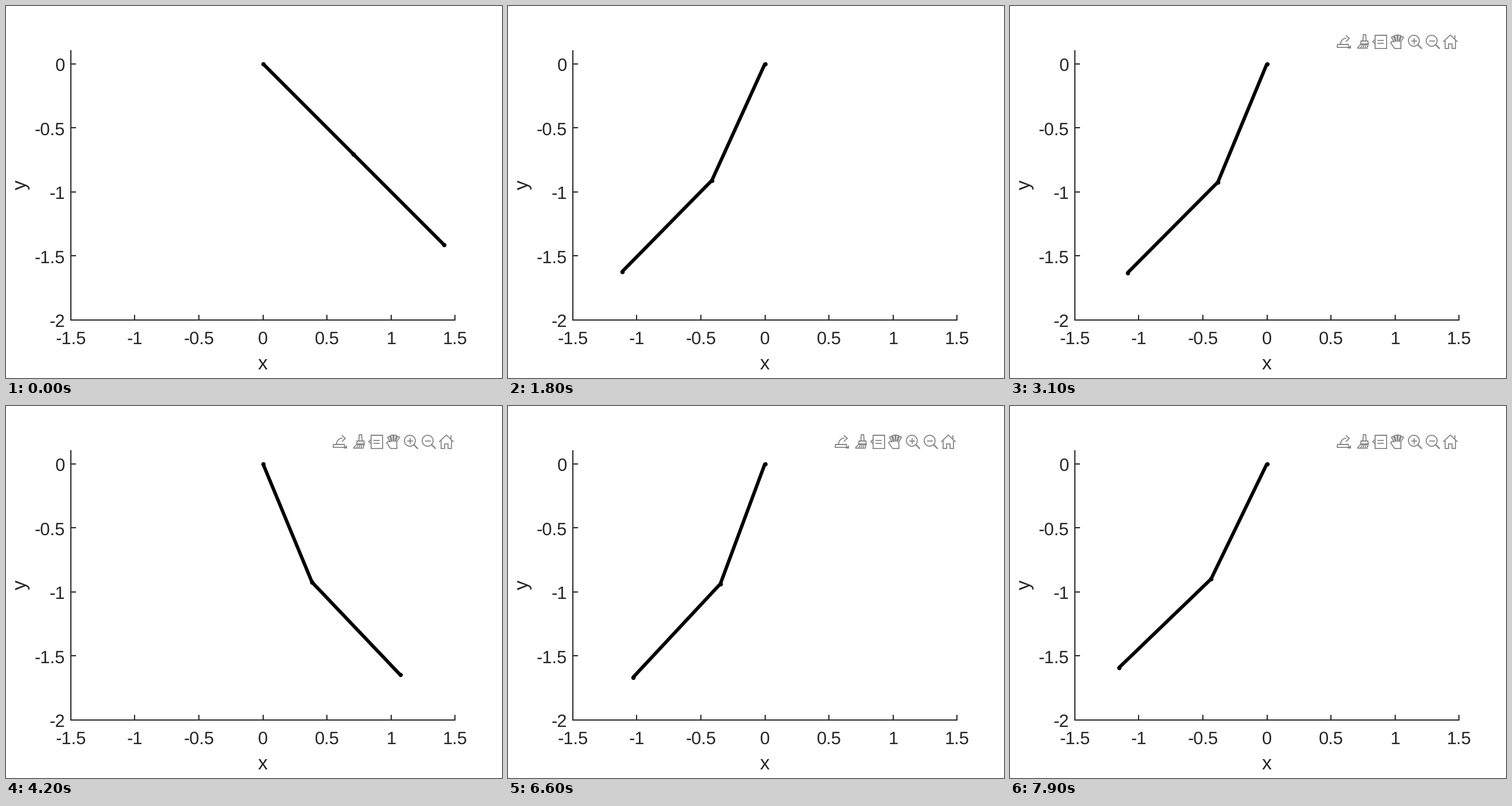
Write a matplotlib script that moves like this. It is 864 by 648 pixels and loops after 8000 ms.

```python
import numpy as np
import matplotlib.pyplot as plt
from matplotlib.animation import FuncAnimation

W, H, DPI = 864, 648, 72
FRAMES, INTERVAL = 80, 100
STEP, SUBSTEPS = 0.05, 5
TOOLBAR_FROM = 23
INK, GREY = "#262626", "#868686"
X0, Y0, UNIT = 447.6, 100.6, 223.15

# Key poses: step -> link angles in degrees.
POSES = {31: (-22.5, -44.9), 54: (29.1, 47.4), 79: (-25.9, -46.0)}


def px(x, y):
    return X0 + UNIT * x, Y0 - UNIT * y


# ---- motion: two unit rods, released at rest from 45 degrees ----

def slope(state, gravity, inertia, drag):
    a, b, u, v = state
    m1, m2 = 1.25 + inertia, 0.25 + inertia
    c, s = 0.5 * np.cos(a - b), 0.5 * np.sin(a - b)
    p = -1.5 * gravity * np.sin(a) - s * v * v - drag * u
    q = -0.5 * gravity * np.sin(b) + s * u * u - drag * v
    d = m1 * m2 - c * c
    return np.array([u, v, (m2 * p - c * q) / d, (m1 * q - c * p) / d])


def swing(consts):
    """Angles per step, for one column of constants per run."""
    state = np.zeros((4, consts.shape[1]))
    state[:2] = np.pi / 4
    h = STEP / SUBSTEPS
    out = [state[:2]]
    for _ in range(FRAMES - 1):
        for _ in range(SUBSTEPS):
            k1 = slope(state, *consts)
            k2 = slope(state + h / 2 * k1, *consts)
            k3 = slope(state + h / 2 * k2, *consts)
            k4 = slope(state + h * k3, *consts)
            state = state + h / 6 * (k1 + 2 * k2 + 2 * k3 + k4)
        out.append(state[:2])
    return np.array(out)


def tune(eps=1e-5):
    """Gauss-Newton on gravity, inertia and drag, through the key poses."""
    consts = np.array([9.81, 1 / 12, 0.0])
    limit = np.array([0.2, 0.01, 0.01])
    goal = np.radians(list(POSES.values())).ravel()
    for _ in range(10):
        trial = np.column_stack([consts, consts[:, None] + eps * np.eye(3)])
        got = swing(trial)[list(POSES)].reshape(-1, 4)
        jac = (got[:, 1:] - got[:, :1]) / eps
        move = np.linalg.lstsq(jac, goal - got[:, 0], rcond=None)[0]
        consts = consts + np.clip(move, -limit, limit)
    return consts


angles = swing(tune()[:, None])[:, :, 0]
joints = np.zeros((FRAMES, 3, 2))
joints[:, 1:, 0] = np.cumsum(np.sin(angles), axis=1)
joints[:, 1:, 1] = -np.cumsum(np.cos(angles), axis=1)

# ---- stage ----

plt.rcParams["font.family"] = "Liberation Sans"
plt.rcParams["text.hinting"] = "none"
fig = plt.figure(figsize=(W / DPI, H / DPI), dpi=DPI, facecolor="white")
ax = fig.add_axes([0, 0, 1, 1])
ax.set_xlim(0, W)
ax.set_ylim(H, 0)
ax.axis("off")


def stroke(xs, ys, color=GREY, width=1.8, cap="butt"):
    return ax.plot(xs, ys, color=color, lw=width, solid_capstyle=cap,
                   solid_joinstyle="miter")[0]


def label(x, y, text, size=30.9, **kw):
    kw = {"ha": "center", "va": "baseline", **kw}
    ax.text(x, y, text, size=size, color=INK, **kw)


left, base = px(-1.5, -2)
right, top = px(1.5, 0.1)
stroke([left, left, right], [top, base, base], INK, 2, "projecting")
for t in np.arange(-1.5, 1.6, 0.5):
    x = px(t, 0)[0]
    stroke([x, x], [base, base - 9], INK, 2)
    label(x, 589, f"{t:g}")
for t in np.arange(-2, 0.1, 0.5):
    y = px(0, t)[1]
    stroke([left, left + 9], [y, y], INK, 2)
    label(103, y + 12.5, f"{t:g}", ha="right")
label(X0, 633, "x", 34)
label(36, 312, "y", 34, rotation=90, rotation_mode="anchor")

# ---- toolbar icons, 31 px apart ----

def arc(cx, cy, r, start=0, end=360):
    t = np.radians(np.linspace(start, end, 40))
    return stroke(cx + r * np.cos(t), cy + r * np.sin(t))


def trapezoid(cx, y0, y1, w0, w1, lean=0):
    """Outline with top width w0, bottom width w1, foot moved by lean."""
    xs = cx + np.array([-w0, w0, w1, -w1, -w0, w0]) / 2
    xs[2:4] += lean
    return stroke(xs, [y0, y0, y1, y1, y0, y0])


def export(cx):
    return [trapezoid(cx, 67, 72, 19, 20),
            arc(cx + 6, 66, 10, 180, 270),
            stroke(cx + np.array([5, 11, 5]), [51, 56.5, 62]),
            ax.fill(cx + np.array([14, 14, 8]), [67.5, 73.5, 73.5],
                    color=GREY, lw=0)[0]]


def brush(cx):
    hairs = [stroke([cx + d, cx + 1.3 * d - 3], [67, 73], width=1.6)
             for d in (-3, 0, 3)]
    return hairs + [trapezoid(cx, 50, 61, 4, 6),
                    trapezoid(cx, 61, 66.5, 12, 13),
                    trapezoid(cx, 66.5, 73.5, 13, 17, -4)]


def tip(cx):
    notch = stroke(cx - np.array([9, 12.5, 9]), [58.5, 62, 65.5])
    return [trapezoid(cx + 1, 50.5, 73.5, 20, 20), notch] + [
        stroke([cx - 5, cx + 6], [y, y]) for y in (59.5, 64.5)]


def hand(cx):
    """Four fingers fanned from the wrist, closed by palm and thumb."""
    fan = np.radians([-25, -8, 8, 25])
    a = (fan[:, None] + [-0.1, -0.1, 0.1, 0.1]).ravel()
    reach = 21.5 - 6 * fan ** 2
    r = np.column_stack([0 * fan + 11, reach, reach, 0 * fan + 11]).ravel()
    xs, ys = cx + r * np.sin(a), 72 - r * np.cos(a)
    palm = cx + np.array([6, -5, -12, -9.5])
    return [stroke([*xs, *palm, xs[0]], [*ys, 74, 74, 64, 61.5, ys[0]])]


def lens(cx, plus):
    parts = [arc(cx, 60.5, 9.5),
             stroke([cx + 6.8, cx + 14], [67.3, 74.5], width=2.4),
             stroke([cx - 5, cx + 5], [60.5, 60.5])]
    if plus:
        parts.append(stroke([cx, cx], [55.5, 65.5]))
    return parts


def home(cx):
    walls = cx + np.array([-9, -9, -3, -3, 3, 3, 9, 9])
    return [stroke([cx - 12.5, cx, cx + 12.5], [62.5, 50.5, 62.5]),
            stroke(walls, [60, 74, 74, 65.5, 65.5, 74, 74, 60]),
            stroke([cx + 8, cx + 8], [57, 51])]


toolbar = (export(580) + brush(617.5) + tip(644.5) + hand(675)
           + lens(703.5, True) + lens(734.5, False) + home(767))

links = [ax.plot([], [], color="black", lw=6, marker="o", ms=7.5, mew=0,
                 solid_capstyle="butt", zorder=5)[0] for _ in range(2)]


def draw(i):
    for k, link in enumerate(links):
        link.set_data(*px(*joints[i, k:k + 2].T))
    for part in toolbar:
        part.set_visible(i >= TOOLBAR_FROM)
    return links + toolbar


anim = FuncAnimation(fig, draw, frames=FRAMES, interval=INTERVAL,
                     repeat=True, repeat_delay=0)
plt.show()
```
